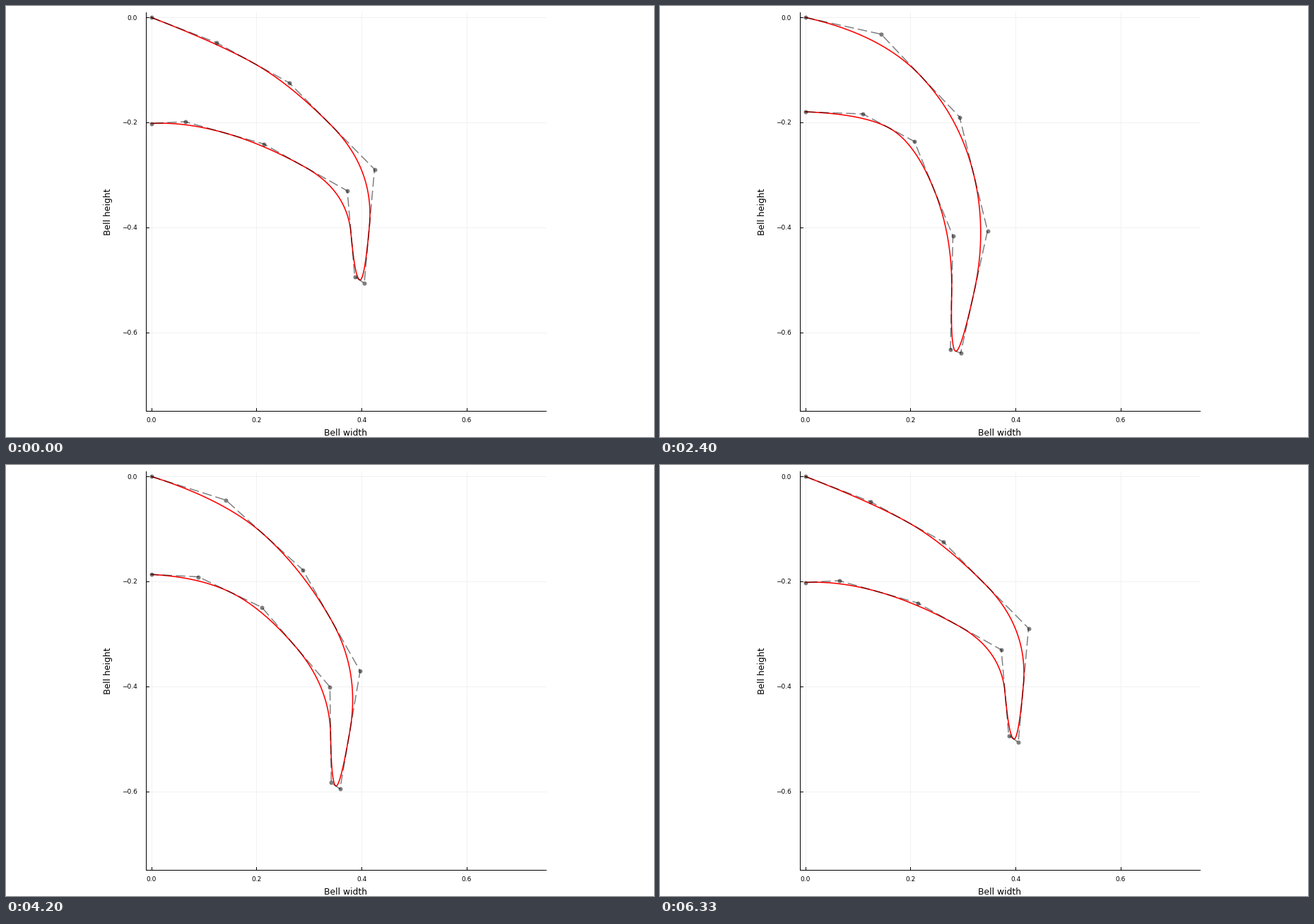
A matplotlib script for the animation above (6740 ms loop, 917x611 px).

```python
import numpy as np
import matplotlib.pyplot as plt
from matplotlib.animation import FuncAnimation

W, H, DPI = 917, 611, 64
PX = 72 / DPI                 # one pixel in points
LOOP_MS, TICK_MS = 6740, 20
LAST = 95                     # steps of 1/15 s, then the pose rests

plt.rcParams["font.family"] = "DejaVu Sans"

# Control polygon, outer root to inner root: x1 y1 ... x8 y8, then the
# height of the inner root. Both roots stay on the centre line.
ROOT = (205.5, 16.2)
REST = [298, 52, 401, 109, 521.5, 231.5, 507, 393, 493.5, 383.5,
        483, 262, 364.5, 195.5, 253.5, 164, 166.5]
FLARE = [290.5, 41, 404, 108, 508, 246, 525.5, 411, 515, 411,
         465.5, 265.5, 362.5, 189, 255, 160, 160.5]
LIFT = [284, 33, 405, 110, 496.5, 257, 530.5, 398, 521, 399,
        449, 270, 355.5, 188, 255.5, 160.5, 160]
SQUEEZE = [270.5, 17.8, 406, 124, 461.3, 294, 487.5, 360.5, 485, 376,
           401, 288, 335.5, 197, 258.5, 168, 162.5]
CLOSED = [313, 40, 424, 157.5, 463.5, 318.5, 425.5, 492, 411, 486.5,
          414.5, 326, 360, 192, 287, 153, 150]
HANG = [315, 42.5, 425, 159, 472.5, 316.5, 434, 490.5, 420, 484,
        423.5, 328, 361.5, 194.5, 286.5, 154, 150.3]
OPEN = [314.5, 47.5, 423, 157.5, 489, 307, 455, 477, 442, 468.5,
        443.5, 326, 361.5, 200.5, 279, 157, 152.5]
WIDE = [306, 51, 415, 134, 512.5, 270, 490.5, 434.5, 478.5, 426,
        472, 295.5, 363.5, 200.5, 265, 160, 159]


def mix(a, b, u):
    return (1 - u) * np.array(a) + u * np.array(b)


KEYS = [
    (0, REST), (7, FLARE), (11, LIFT), (21, SQUEEZE),
    (22, mix(SQUEEZE, CLOSED, 0.03)), (33, mix(SQUEEZE, CLOSED, 0.935)),
    (36, CLOSED), (44, HANG), (55, OPEN), (72, WIDE), (LAST, REST),
]


def cubic_track(t, v, at):
    """Cubic spline through (t, v), at rest at both ends."""
    h = np.diff(t)
    d = np.diff(v, axis=0) / h[:, None]
    n = len(t)
    a, rhs = np.eye(n), np.zeros_like(v)
    for i in range(1, n - 1):
        p, q = 1 / h[i - 1], 1 / h[i]
        a[i, i - 1:i + 2] = p, 2 * (p + q), q
        rhs[i] = 3 * (p * d[i - 1] + q * d[i])
    m = np.linalg.solve(a, rhs)
    i = np.clip(np.searchsorted(t, at, side="right") - 1, 0, n - 2)
    w = h[i][:, None]
    u = (at - t[i])[:, None] / w
    return ((1 + 2 * u) * (1 - u) ** 2 * v[i] + u * (1 - u) ** 2 * w * m[i]
            + u * u * (3 - 2 * u) * v[i + 1] + u * u * (u - 1) * w * m[i + 1])


POSES = cubic_track(np.array([k for k, _ in KEYS], float),
                    np.array([p for _, p in KEYS], float),
                    np.arange(LAST + 1.0))


def polygon(step):
    row = POSES[step]
    return np.vstack([ROOT, row[:16].reshape(8, 2), (ROOT[0], row[16])])


def bspline(pts):
    """Clamped uniform quadratic B-spline."""
    mids = (pts[1:-2] + pts[2:-1]) / 2
    joints = np.vstack([pts[:1], mids, pts[-1:]])
    u = np.linspace(0, 1, 24)[:, None]
    parts = [(1 - u) ** 2 * a + 2 * u * (1 - u) * c + u * u * b
             for a, c, b in zip(joints, pts[1:-1], joints[1:])]
    return np.vstack(parts)


fig = plt.figure(figsize=(W / DPI, H / DPI), dpi=DPI, facecolor="white")
ax = fig.add_axes([0, 0, 1, 1])
ax.set_xlim(0, W)
ax.set_ylim(H, 0)
ax.axis("off")

LEFT, RIGHT, TOP, BOTTOM = 198.3, 763.7, 9, 574.3
UNIT = 744                    # pixels per data unit


def stroke(x, y, color="black", width=1.0, **kw):
    return ax.plot(x, y, color=color, lw=width * PX, **kw)[0]


def label(x, y, s, size, **kw):
    ax.text(x, y, s, fontsize=size * PX, va="baseline", **kw)


for i in range(4):
    x, y = ROOT[0] + 0.2 * i * UNIT, ROOT[1] + 0.2 * i * UNIT
    stroke([x, x], [TOP, BOTTOM], "#f0f0f0", 0.9)
    stroke([LEFT, RIGHT], [y, y], "#f0f0f0", 0.9)
for i in range(4):
    x, y = ROOT[0] + 0.2 * i * UNIT, ROOT[1] + 0.2 * i * UNIT
    stroke([x, x], [BOTTOM, BOTTOM - 4], zorder=3)
    stroke([LEFT, LEFT + 4], [y, y], zorder=3)
    label(x, 590, f"{0.2 * i:.1f}", 9, ha="center")
    sign = "\u2212" if i else ""
    label(185.5, y + 3.5, f"{sign}{0.2 * i:.1f}", 9, ha="right")
stroke([LEFT, LEFT], [TOP, BOTTOM], zorder=3)
stroke([LEFT, RIGHT], [BOTTOM, BOTTOM], zorder=3)
label(480.7, 608.7, "Bell width", 12.35, ha="center")
label(147.8, 291.7, "Bell height", 12.35, ha="center",
      rotation=90, rotation_mode="anchor")

curve = stroke([], [], "red", 1.6, zorder=4)
frame_line = stroke([], [], "black", 1.5, alpha=0.5, zorder=5,
                    linestyle=(0, (9, 3.7)))
knots = stroke([], [], "black", 0, alpha=0.5, zorder=6, marker="o",
               markersize=6 * PX, markeredgewidth=0, linestyle="none")


def draw(i):
    t = (i + 0.5) * TICK_MS
    step = min(LAST, int((t + 4) * 15 / 1000))
    pts = polygon(step)
    curve.set_data(*bspline(pts).T)
    frame_line.set_data(*pts.T)
    knots.set_data(*pts.T)
    return curve, frame_line, knots


anim = FuncAnimation(fig, draw, frames=LOOP_MS // TICK_MS, interval=TICK_MS,
                     repeat=True, repeat_delay=0, blit=False)
plt.show()
```
